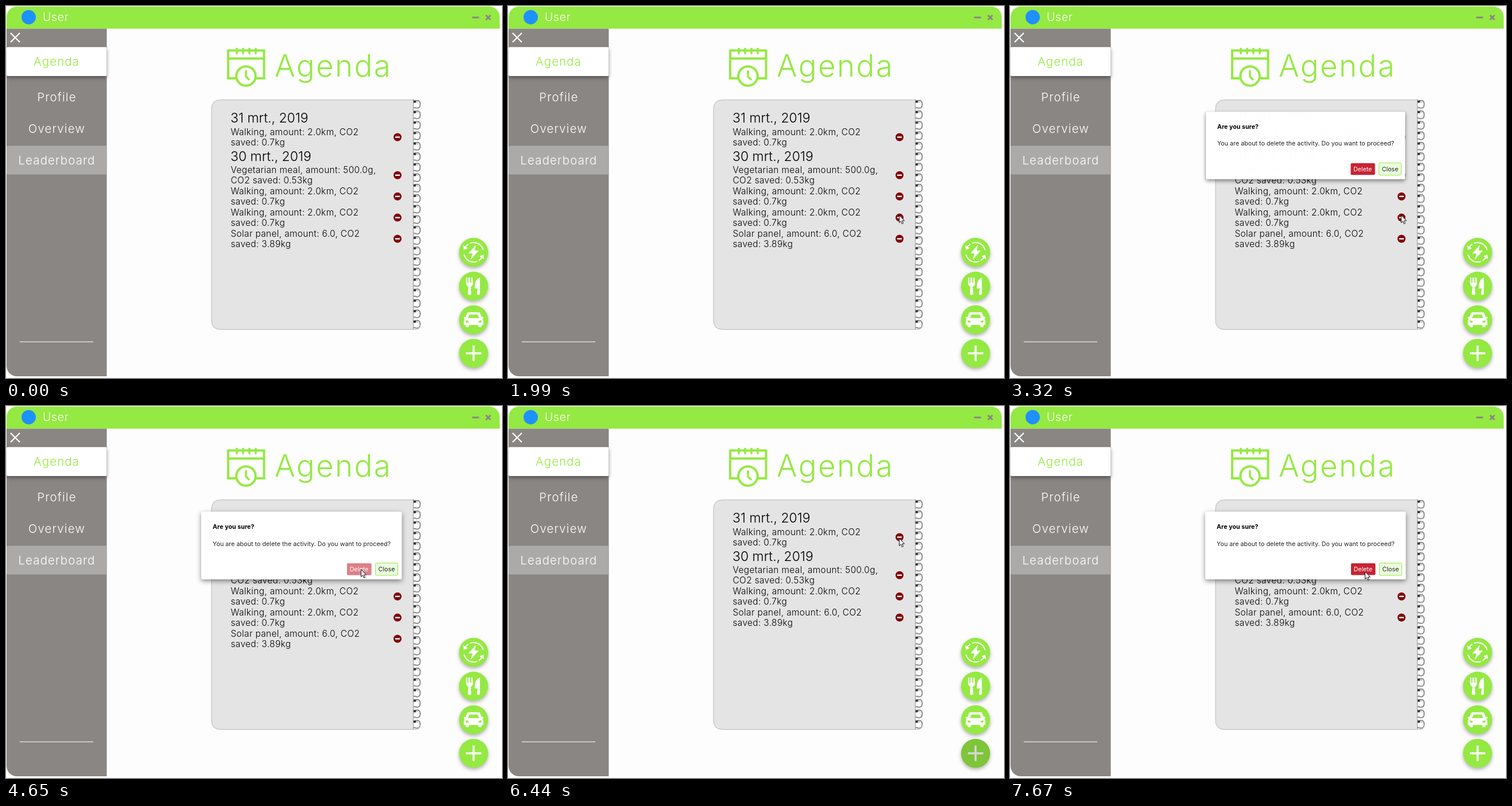
Recreate the animation shown at these times as an HTML page. Size 864 by 648 pixels, loop 8 s.

```html
<!DOCTYPE html>
<html lang="en">
<head>
<meta charset="utf-8">
<title>Agenda</title>
<style>
  @property --open { syntax: "<number>"; inherits: true; initial-value: 0; }

  :root { --green: #95e943; --grey: #8a8684; }
  html, body { margin: 0; width: 100%; height: 100%; overflow: hidden; background: #fff; }
  svg { display: block; width: 864px; height: 648px; }
  text { font-family: Montserrat, Inter, "Open Sans", sans-serif; font-weight: 350; }

  .nav { font-size: 20.5px; letter-spacing: 1.1px; fill: #fff; text-anchor: middle; }
  .title { font-size: 53px; font-weight: 300; letter-spacing: 2.3px; fill: var(--green); }
  .day { font-size: 23px; }
  .item { font-size: 15.5px; letter-spacing: .32px; }
  .small { font-size: 10.7px; letter-spacing: .04px; font-weight: 400; }
  .mid { text-anchor: middle; }
  .line { fill: none; stroke: var(--green); stroke-width: 4; }
  .fab > circle { fill: var(--green); filter: drop-shadow(0 3px 3px rgba(0, 0, 0, .3)); }
  .tab { fill: #fff; filter: drop-shadow(0 3px 3px rgba(0, 0, 0, .4)); }

  .anim { animation: 8s step-end infinite; }
  #cursor { animation-name: point; }
  #dialog { animation-name: dialog; opacity: var(--open); }
  #card { transform: scale(var(--open)); transform-origin: 514.5px 243px; }
  #card > .paper { fill: #fff; filter: drop-shadow(0 3px 4px rgba(0, 0, 0, .45)); }
  #removed { animation-name: remove; }
  #last { animation-name: shift; }
  #shade { animation-name: shade; }
  .ripple { transform-box: fill-box; transform-origin: center; }
  #tapA { animation-name: tap-a; }
  #tapB { animation-name: tap-b; }
  #tapDelete { animation-name: tap-delete; }

  @keyframes point {
    0% { transform: translate(787px, 662px); }
    8.5% { transform: translate(787px, 662px); animation-timing-function: steps(5, start); }
    13.3125% { transform: translate(722px, 512px); animation-timing-function: steps(6, start); }
    19.125% { transform: translate(683px, 418px); animation-timing-function: steps(7, start); }
    25.83% { transform: translate(681px, 364px); }
    43.5% { transform: translate(680px, 364px); }
    46.25% { transform: translate(680px, 364px); animation-timing-function: steps(4, start); }
    50.1% { transform: translate(618px, 284px); }
    67.75% { transform: translate(618px, 284px); animation-timing-function: steps(9, start); }
    76.47% { transform: translate(675px, 237px); }
    77.375% { transform: translate(675px, 237px); animation-timing-function: steps(2, start); }
    79.375% { transform: translate(680px, 234px); }
    80.5% { transform: translate(681px, 230px); }
    90.08% { transform: translate(681px, 230px); animation-timing-function: steps(4, start); }
    93.875% { transform: translate(610px, 251px); animation-timing-function: steps(3, start); }
    96.875%, 100% { transform: translate(618px, 288px); }
  }
  @keyframes dialog {
    0% { --open: 0; }
    36.625%, 86.125% { --open: .03; }
    37.625%, 87.1% { --open: .15; }
    38.625%, 88.1% { --open: .38; }
    39.5625%, 89.05% { --open: .63; }
    40.5%, 90% { --open: .87; }
    41.5%, 91% { --open: .994; }
    42.5%, 92%, 100% { --open: 1; }
    60% { --open: .985; }
    61.125% { --open: .9; }
    62.25% { --open: .65; }
    63.375% { --open: .36; }
    64% { --open: 0; }
  }
  @keyframes remove { 0% { opacity: 1; } 60%, 100% { opacity: 0; } }
  @keyframes shift { 0% { transform: none; } 60%, 100% { transform: translateY(-37px); } }
  @keyframes shade {
    0% { opacity: 0; }
    65.875% { opacity: .01; }
    67.75% { opacity: .01; animation-timing-function: steps(7, start); }
    74.5% { opacity: .15; }
    86.125% { opacity: .15; animation-timing-function: steps(5, start); }
    91%, 100% { opacity: 0; }
  }
  @keyframes tap-a {
    0% { opacity: 0; transform: scale(.5); }
    32.5% { opacity: .05; transform: scale(.7); }
    33.625% { opacity: .08; transform: scale(.9); }
    34.75% { opacity: .08; transform: none; }
    36.625%, 100% { opacity: 0; transform: none; }
  }
  @keyframes tap-b {
    0% { opacity: 0; transform: scale(.5); }
    83.125% { opacity: .05; transform: scale(.7); }
    84.125% { opacity: .08; transform: scale(.9); }
    85.125% { opacity: .08; transform: none; }
    87.1%, 100% { opacity: 0; transform: none; }
  }
  @keyframes tap-delete {
    0% { opacity: 0; transform: scale(.2); }
    54.125% { opacity: .25; transform: scale(.3); }
    55.125% { opacity: .35; transform: scale(.6); }
    56.125% { opacity: .4; transform: none; }
    58.125% { opacity: .42; transform: none; }
    61.125%, 100% { opacity: 0; transform: none; }
  }
</style>
</head>
<body>
<svg viewBox="0 0 864 648">
  <defs>
    <g id="minus">
      <circle r="7" fill="#820006"/>
      <path d="M-4 0H4" stroke="#fff" stroke-width="2.4"/>
    </g>
    <pattern id="rings" x="709" y="162" width="14" height="18.25" patternUnits="userSpaceOnUse">
      <path d="M.5 0V18.25" stroke="#999"/>
      <path d="M3 3.5Q9 1 11.5 4.5Q13.5 9 11.5 14Q8 17.5 3 15" fill="none" stroke="#777" stroke-width="1.6"/>
      <path d="M3 5.5Q7.5 4 9.5 6.5" fill="none" stroke="#aaa"/>
      <path d="M1 4.5H5" stroke="#333" stroke-width="4"/>
      <path d="M1 15H4" stroke="#777" stroke-width="1.6"/>
    </pattern>
    <clipPath id="deleteBox"><rect x="594" y="274" width="42.5" height="20.5" rx="2"/></clipPath>
  </defs>

  <!-- window -->
  <path d="M1 40H860V645H19Q1 645 1 627Z" fill="#fdfdfd"/>
  <path d="M1 39.5V19A18 18 0 0 1 19 1H842A18 18 0 0 1 860 19V39.5Z" fill="var(--green)"/>
  <circle cx="39.5" cy="19.5" r="12.5" fill="#1e90ff"/>
  <text x="64" y="26" font-size="19.5" letter-spacing=".7" fill="#fff">User</text>
  <path d="M812 20H824" stroke="var(--grey)" stroke-width="3"/>
  <path d="M836 16L844 24M844 16L836 24" stroke="var(--grey)" stroke-width="3"/>

  <!-- sidebar -->
  <path d="M1 39.5H175.5V645H19A18 18 0 0 1 1 627Z" fill="var(--grey)"/>
  <path d="M8 47L24 63M24 47L8 63" stroke="#fff" stroke-width="2.2"/>
  <rect class="tab" x="1" y="71.5" width="174.5" height="50.5" rx="2"/>
  <rect x="1" y="243.5" width="174.5" height="50" rx="2" fill="#acaaa9"/>
  <text class="nav" x="88" y="104" style="fill:var(--green)">Agenda</text>
  <text class="nav" x="88.5" y="165.5">Profile</text>
  <text class="nav" x="88.5" y="220.5">Overview</text>
  <text class="nav" x="88.5" y="276">Leaderboard</text>
  <path d="M24 585H152" stroke="#dcdbda" stroke-width="1.4"/>

  <!-- heading -->
  <g class="line">
    <path d="M400 126H387V77.5H449.5V126H436M387 91.5H449"/>
    <path d="M402 73V84M413 73V84M424 73V84M435 73V84" stroke-width="3.4"/>
    <circle cx="418" cy="122" r="16.8"/>
    <path d="M418 112V123L424 129" stroke-width="3.4"/>
  </g>
  <text class="title" x="468" y="122.5">Agenda</text>

  <!-- notebook -->
  <path d="M709.5 163.5H374Q358 163.5 358 179.5V547.5Q358 563.5 374 563.5H709.5Z" fill="#e4e4e4" stroke="#b9b9b9"/>
  <rect x="709" y="162" width="14" height="401.5" fill="url(#rings)"/>
  <path d="M709 563.5H714Q721 563 722 555" fill="none" stroke="#b9b9b9"/>

  <circle id="tapA" class="anim ripple" cx="681.5" cy="366.5" r="13"/>
  <circle id="tapB" class="anim ripple" cx="681.5" cy="228.5" r="13"/>

  <text class="day" x="391" y="203">31 mrt., 2019</text>
  <text class="item" y="224.5"><tspan x="391.5">Walking, amount: 2.0km, CO2</tspan><tspan x="391.5" dy="18.4">saved: 0.7kg</tspan></text>
  <use href="#minus" x="682" y="228.5"/>
  <text class="day" x="391" y="269.5">30 mrt., 2019</text>
  <text class="item" y="290.7"><tspan x="391.5">Vegetarian meal, amount: 500.0g,</tspan><tspan x="391.5" dy="18.4">CO2 saved: 0.53kg</tspan></text>
  <use href="#minus" x="682" y="294.7"/>
  <text class="item" y="327.7"><tspan x="391.5">Walking, amount: 2.0km, CO2</tspan><tspan x="391.5" dy="18.4">saved: 0.7kg</tspan></text>
  <use href="#minus" x="682" y="331.7"/>
  <g id="removed" class="anim">
    <text class="item" y="364.7"><tspan x="391.5">Walking, amount: 2.0km, CO2</tspan><tspan x="391.5" dy="18.4">saved: 0.7kg</tspan></text>
    <use href="#minus" x="682" y="368.6"/>
  </g>
  <g id="last" class="anim">
    <text class="item" y="401.6"><tspan x="391.5">Solar panel, amount: 6.0, CO2</tspan><tspan x="391.5" dy="18.4">saved: 3.89kg</tspan></text>
    <use href="#minus" x="682" y="405.5"/>
  </g>

  <!-- round buttons -->
  <g class="fab" transform="translate(814.5 429)">
    <circle r="25.3"/>
    <path d="M-16.5 4A17 17 0 0 0 6 15.9M16.5-4A17 17 0 0 0-6-15.9M-15.5-7A17 17 0 0 1-9-14.4M15.5 7A17 17 0 0 1 9 14.4" fill="none" stroke="#fff" stroke-width="2"/>
    <path d="M-18-12L-17-4-10-7ZM18 12L17 4 10 7ZM4-13L-9 2H-2L-5 13 9-3H2Z" fill="#fff"/>
  </g>
  <g class="fab" transform="translate(814.5 488)">
    <circle r="25.3"/>
    <path d="M-13-15H-11V-6H-9V-15H-6V-6H-4V-15H-2L-1-5Q-1-1-5 1L-4 14Q-7 17-10 14L-9 1Q-13-1-13-5ZM11-15V14Q8 17 6 14L7 4H2Q2-12 11-15Z" fill="#fff"/>
  </g>
  <g class="fab" transform="translate(814.5 546.5)">
    <circle r="25.3"/>
    <path d="M-9-13H9Q11-13 12-10L14-5H17V-2H15Q17 0 17 3V9H14V11Q14 13 12 13H10Q8 13 8 11V9H-8V11Q-8 13-10 13H-12Q-14 13-14 11V9H-17V3Q-17 0-15-2H-17V-5H-14L-12-10Q-11-13-9-13Z" fill="#fff"/>
    <path d="M-7-9H7L10-3H-10ZM-14 1Q-9 1-8 5H-13ZM14 1Q9 1 8 5H13Z" fill="var(--green)"/>
  </g>
  <g class="fab" transform="translate(814.5 605)">
    <circle r="25.3"/>
    <path d="M-13.5 0H13.5M0-13.5V13.5" stroke="#fff" stroke-width="3.6"/>
  </g>
  <circle id="shade" class="anim" cx="814.5" cy="605" r="25.3"/>

  <!-- confirmation -->
  <g id="dialog" class="anim">
    <rect x="340" y="184" width="349.5" height="118" opacity=".1"/>
    <g id="card">
      <rect class="paper" x="340" y="184" width="349.5" height="118" rx="2"/>
      <text class="small" x="360" y="214" style="font-weight:700">Are you sure?</text>
      <text class="small" x="360" y="243.5" fill="#222">You are about to delete the activity. Do you want to proceed?</text>
      <rect x="594" y="274" width="42.5" height="20.5" rx="2" fill="#c82333"/>
      <text class="small mid" x="615" y="288.2" fill="#fff">Delete</text>
      <g clip-path="url(#deleteBox)"><circle id="tapDelete" class="anim ripple" cx="617" cy="284" r="30" fill="#fff"/></g>
      <rect x="643.5" y="273.5" width="39" height="21.5" rx="2" fill="#ebffdf" stroke="var(--green)"/>
      <text class="small mid" x="663" y="288.2" fill="#222">Close</text>
    </g>
  </g>

  <path id="cursor" class="anim" d="M.5 .5V13.5L3.4 10.8 5.4 15.5 7.5 14.6 5.5 10H9.5Z" fill="#fff" stroke="#111"/>
</svg>
</body>
</html>
```
